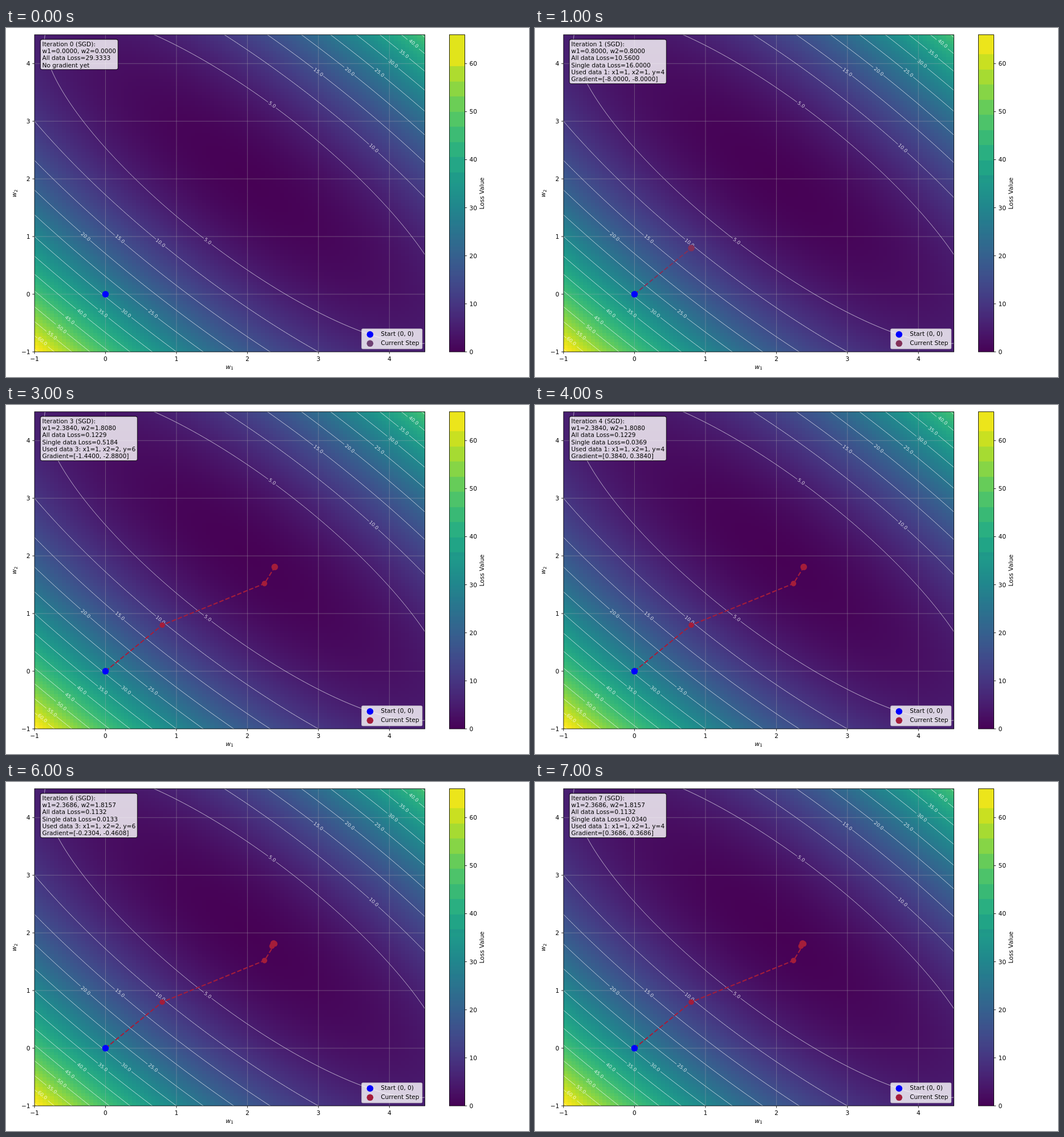
Animation of 917x611 px, one loop 8000 ms. Source, as an HTML page with a canvas:

```html
<!DOCTYPE html>
<html lang="en">
<head>
<meta charset="utf-8">
<title>SGD on a loss surface</title>
<style>
  html, body { margin: 0; width: 100%; height: 100%; overflow: hidden; background: #fff; }
  canvas { display: block; width: 917px; height: 611px; }
</style>
</head>
<body>
<canvas id="stage" width="917" height="611"></canvas>
<script>
const ctx = document.getElementById('stage').getContext('2d');
const PLOT = { left: 50, top: 11.8, right: 734.5, bottom: 567 };
const BAR = { left: 777.5, right: 804.5 };
const MIN = -1, MAX = 4.5, PEAK = 66, STEP_MS = 1000;
const FONT = '"DejaVu Sans", sans-serif';
const SIZE = 10.61, THIN = 0.85;

const samples = [[1, 1, 4], [2, 1, 6], [1, 2, 6]];
const path = [[0, 0], [0.8, 0.8], [2.24, 1.52], [2.384, 1.808], [2.384, 1.808],
  [2.3456, 1.7696], [2.36864, 1.81568], [2.36864, 1.81568]];
const used = [-1, 0, 1, 2, 0, 2, 2, 0];
const reds = ['#6e4173', '#823058', '#962344', '#a41d3a'];

// Contour labels: level, then x, y of each label
const labels = [
  [5, 467, 134, 354, 373], [10, 645, 210, 271, 376], [15, 548, 77, 200, 369],
  [20, 603, 76, 140, 365], [25, 655, 78, 258, 500], [30, 679, 62, 211, 499],
  [35, 698, 45, 170, 499], [40, 715, 27, 133, 499], [45, 112, 511],
  [50, 98, 527], [55, 81, 538], [60, 64, 548], [65]
];

const sx = (PLOT.right - PLOT.left) / (MAX - MIN);
const sy = (PLOT.bottom - PLOT.top) / (MAX - MIN);
const toX = a => PLOT.left + (a - MIN) * sx;
const toY = b => PLOT.bottom - (b - MIN) * sy;
const barY = v => PLOT.bottom - v / PEAK * (PLOT.bottom - PLOT.top);
const residual = ([x1, x2, y], [a, b]) => a * x1 + b * x2 - y;
const loss = w => samples.reduce((sum, s) => sum + residual(s, w) ** 2, 0) / 3;

// Polynomial fit of the viridis colour map, highest power first
const viridis = [
  [-5.43546, 4.77638, 6.22827, -4.63423, -0.33086, 0.10509, 0.27773],
  [4.64585, -13.74515, 14.17993, -5.7991, 0.21485, 1.40461, 0.00541],
  [26.31244, -65.35303, 56.69055, -19.33244, 0.0951, 1.38459, 0.3341]
];
const color = t => viridis.map(c =>
  Math.max(0, Math.min(255, Math.round(255 * c.reduce((sum, k) => sum * t + k, 0)))));

function text(str, x, y, { size = SIZE, align = 'left', angle = 0, fill = '#000', style = '' } = {}) {
  ctx.save();
  ctx.translate(x, y);
  ctx.rotate(angle);
  ctx.font = `${style} ${size}px ${FONT}`;
  ctx.textAlign = align;
  ctx.fillStyle = fill;
  ctx.fillText(str, 0, size * 0.365);
  ctx.restore();
}

function line(x1, y1, x2, y2, stroke = '#000', width = THIN) {
  ctx.strokeStyle = stroke;
  ctx.lineWidth = width;
  ctx.beginPath();
  ctx.moveTo(x1, y1);
  ctx.lineTo(x2, y2);
  ctx.stroke();
}

function dot(x, y, r, fill) {
  ctx.fillStyle = fill;
  ctx.beginPath();
  ctx.arc(x, y, r, 0, 2 * Math.PI);
  ctx.fill();
}

function panel(x, y, w, h, r, edge) {
  ctx.beginPath();
  ctx.roundRect(x, y, w, h, r);
  ctx.fillStyle = 'rgba(255,255,255,.8)';
  ctx.fill();
  ctx.strokeStyle = edge;
  ctx.lineWidth = 1.06;
  ctx.stroke();
}

function makeHeatmap(n = 100) {
  const map = document.createElement('canvas');
  map.width = map.height = n;
  const g = map.getContext('2d');
  const image = g.createImageData(n, n);
  const at = i => MIN + (MAX - MIN) * i / (n - 1);
  for (let row = 0; row < n; row++) {
    for (let col = 0; col < n; col++) {
      const rgb = color(loss([at(col), at(n - 1 - row)]) / PEAK);
      image.data.set([...rgb, 255], 4 * (row * n + col));
    }
  }
  g.putImageData(image, 0, 0);
  return map;
}
const heatmap = makeHeatmap();

// Each level set is the ellipse 11p² + q² = 3·level around (2, 2)
function drawContour([level, ...spots]) {
  const white = 'rgba(255,255,255,.8)';
  const name = level.toFixed(1);
  const gap = name.length * 2.1 + 1.8;
  const inGap = (x, y) => spots.some((s, i) =>
    i % 2 === 0 && Math.hypot(x - s, y - spots[i + 1]) < gap);
  const p = Math.sqrt(3 * level / 22), q = Math.sqrt(3 * level / 2);
  let drawing = false;
  ctx.beginPath();
  for (let i = 0; i <= 2400; i++) {
    const th = i / 1200 * Math.PI;
    const c = p / Math.sqrt(11) * Math.sqrt(11) * Math.cos(th), s = q * Math.sin(th);
    const x = toX(2 + c + s), y = toY(2 + c - s);
    if (inGap(x, y)) drawing = false;
    else {
      drawing ? ctx.lineTo(x, y) : ctx.moveTo(x, y);
      drawing = true;
    }
  }
  ctx.strokeStyle = white;
  ctx.lineWidth = THIN;
  ctx.stroke();
  for (let i = 0; i < spots.length; i += 2) {
    const u = (spots[i] - toX(2)) / sx, v = (toY(2) - spots[i + 1]) / sy;
    const angle = Math.atan((12 * u + 10 * v) * sy / ((10 * u + 12 * v) * sx));
    text(name, spots[i], spots[i + 1], { size: 8.49, align: 'center', angle, fill: white });
  }
}

function drawSurface() {
  const { left, top, right, bottom } = PLOT;
  ctx.save();
  ctx.beginPath();
  ctx.rect(left, top, right - left, bottom - top);
  ctx.clip();
  ctx.imageSmoothingEnabled = false;
  ctx.drawImage(heatmap, left, top, right - left, bottom - top);
  for (let k = 0; k <= 4; k++) {
    const grey = 'rgba(176,176,176,.45)';
    line(toX(k), top, toX(k), bottom, grey);
    line(left, toY(k), right, toY(k), grey);
  }
  labels.forEach(drawContour);
  ctx.restore();
}

function drawAxes() {
  const { left, top, right, bottom } = PLOT;
  ctx.strokeStyle = '#000';
  ctx.lineWidth = THIN;
  ctx.strokeRect(left, top, right - left, bottom - top);
  for (let k = -1; k <= 4; k++) {
    const name = String(k).replace('-', '\u2212');
    line(toX(k), bottom, toX(k), bottom + 3.7);
    line(left - 3.7, toY(k), left, toY(k));
    text(name, toX(k), 578.7, { align: 'center' });
    text(name, 42.6, toY(k), { align: 'right' });
  }
  axisName('1', 392, 593, 0);
  axisName('2', 14.5, 289.5, -Math.PI / 2);
}

function axisName(sub, x, y, angle) {
  ctx.save();
  ctx.translate(x, y);
  ctx.rotate(angle);
  text('w', -6.7, 0, { style: 'italic' });
  text(sub, 2, 2.6, { size: 7.43 });
  ctx.restore();
}

// The upper part of the bar is coarsely stepped
function drawBar(top) {
  const height = PLOT.bottom - PLOT.top;
  for (let y = PLOT.top; y < PLOT.bottom; y++) {
    let v = PEAK * (PLOT.bottom - y) / height;
    if (v > top) v = (top + PEAK) / 2;
    else if (v > 36) v = top - (Math.floor((top - v) / 3.15) + 0.5) * 3.15;
    ctx.fillStyle = `rgb(${color(v / PEAK)})`;
    ctx.fillRect(BAR.left, y, BAR.right - BAR.left, Math.min(1.5, PLOT.bottom - y));
  }
  ctx.strokeStyle = '#000';
  ctx.lineWidth = THIN;
  ctx.strokeRect(BAR.left, PLOT.top, BAR.right - BAR.left, height);
  for (let v = 0; v <= 60; v += 10) {
    line(BAR.right, barY(v), BAR.right + 3.7, barY(v));
    text(String(v), 812.6, barY(v));
  }
  text('Loss Value', 834, 289.5, { align: 'center', angle: -Math.PI / 2 });
}

function drawPath(step, red) {
  const points = path.slice(0, step + 1).map(([a, b]) => [toX(a), toY(b)]);
  if (step) {
    ctx.beginPath();
    points.forEach(p => ctx.lineTo(...p));
    ctx.setLineDash([7.85, 3.4]);
    ctx.strokeStyle = red;
    ctx.lineWidth = 2.1;
    ctx.stroke();
    ctx.setLineDash([]);
    points.forEach(p => dot(...p, 4.8, red));
    dot(...points[step], 5.8, red);
  }
  dot(...points[0], 5.8, '#00f');
}

function infoLines(step) {
  const w = path[step], f = v => v.toFixed(4);
  const lines = [`Iteration ${step} (SGD):`, `w1=${f(w[0])}, w2=${f(w[1])}`,
    `All data Loss=${f(loss(w))}`];
  if (!step) return [...lines, 'No gradient yet'];
  const sample = samples[used[step]], [x1, x2, y] = sample;
  const r = residual(sample, path[step - 1]) - 1e-12;
  return [...lines, `Single data Loss=${f(r * r)}`,
    `Used data ${used[step] + 1}: x1=${x1}, x2=${x2}, y=${y}`,
    `Gradient=[${f(2 * r * x1)}, ${f(2 * r * x2)}]`];
}

function drawInfo(step) {
  const lines = infoLines(step);
  ctx.font = `${SIZE}px ${FONT}`;
  const width = Math.max(...lines.map(s => ctx.measureText(s).width));
  panel(60.3, 19.9, width + 6.4, lines.length * 12.35 + 3.5, 3.2, 'rgba(0,0,0,.8)');
  lines.forEach((s, i) => text(s, 63.5, 27.9 + i * 12.3));
}

function drawLegend(red) {
  panel(623.7, 526.7, 106, 35, 2.1, 'rgba(204,204,204,.8)');
  dot(638.3, 536.5, 5.8, '#00f');
  dot(638.3, 552.3, 5.8, red);
  text('Start (0, 0)', 657.2, 535.2);
  text('Current Step', 657.2, 551);
}

function draw(step) {
  const red = reds[Math.min(step, reds.length - 1)];
  ctx.fillStyle = '#fff';
  ctx.fillRect(0, 0, 917, 611);
  drawSurface();
  drawPath(step, red);
  drawAxes();
  drawBar(step ? 62 : 59.5);
  drawInfo(step);
  drawLegend(red);
}

let shown = -1;
const start = performance.now();
function tick() {
  const step = Math.floor((performance.now() - start) / STEP_MS) % path.length;
  if (step !== shown) draw(shown = step);
  requestAnimationFrame(tick);
}
tick();
</script>
</body>
</html>
```
